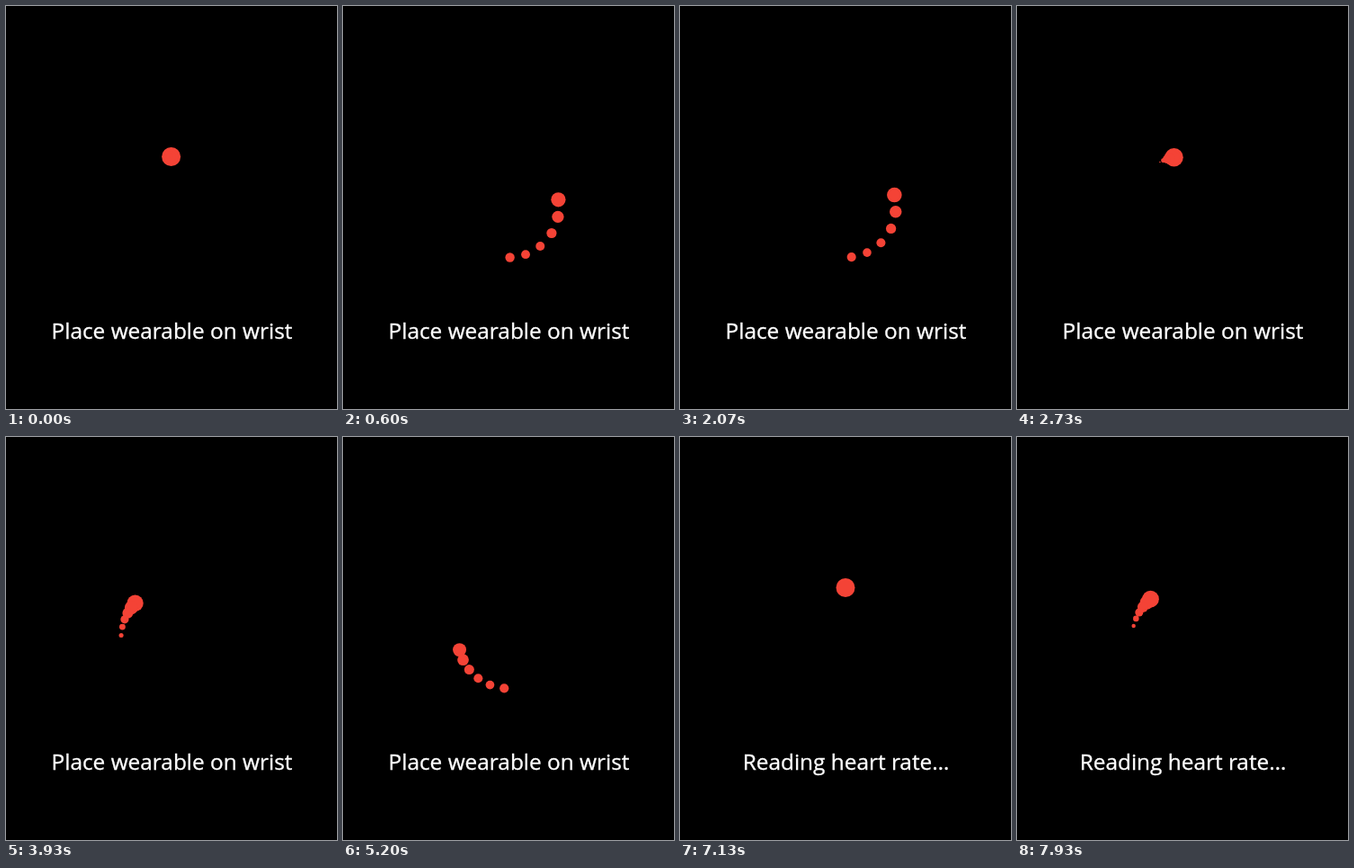
An HTML page that plays this animation: 368 by 448 pixels, repeating every 8 s.

```html
<!DOCTYPE html>
<html lang="en">
<head>
<meta charset="utf-8">
<style>
  html, body { margin: 0; width: 100%; height: 100%; overflow: hidden; background: #000; }
  svg { display: block; width: 368px; height: 448px; }
  circle { fill: #f44336; }
  text {
    font: 24.4px "Open Sans", "Noto Sans", sans-serif;
    fill: #fff; stroke: #fff; stroke-width: .35px; text-anchor: middle;
  }
</style>
</head>
<body>
<svg viewBox="0 0 368 448">
  <g id="spinner"></g>
  <text id="label" x="184.5" y="370"></text>
</svg>
<script>
const LOOP = 8000, FPS = 15;
const SWITCH = 5530;                 // the message changes and the spinner restarts
const FIRST_TURN = 217, RESTART = 5657;
const TURN = 1316, STAGGER = 32, DOTS = 6;
const PERIOD = TURN + STAGGER * (DOTS - 1);
const CENTER = { x: 184, y: 223.5 }, ORBIT = 56, MAX_RADIUS = 10.5;

const spinner = document.getElementById('spinner');
const label = document.getElementById('label');
const dots = Array.from({ length: DOTS }, () =>
  spinner.appendChild(document.createElementNS('http://www.w3.org/2000/svg', 'circle')));

const bezier = (a, b, s) => 3 * a * s * (1 - s) ** 2 + 3 * b * s * s * (1 - s) + s ** 3;

// cubic-bezier(.25, .1, .25, 1), solved by bisection
function ease(x) {
  if (x <= 0) return 0;
  if (x >= 1) return 1;
  let low = 0, high = 1;
  for (let i = 0; i < 24; i++) {
    const mid = (low + high) / 2;
    if (bezier(.25, .25, mid) < x) low = mid; else high = mid;
  }
  return bezier(.1, 1, low);
}

function draw(time) {
  const reading = time >= SWITCH;
  const message = reading ? 'Reading heart rate…' : 'Place wearable on wrist';
  if (label.textContent !== message) label.textContent = message;

  const elapsed = reading
    ? Math.max(0, time - RESTART) % PERIOD
    : (time - FIRST_TURN + PERIOD) % PERIOD;

  dots.forEach((dot, i) => {
    const progress = ease((elapsed - i * STAGGER) / TURN);
    const angle = progress * 2 * Math.PI;
    const rank = i / (DOTS - 1);
    // the leading dot grows during the turn while the last one shrinks
    const size = rank + (1 - 2 * rank) * progress;
    dot.setAttribute('cx', CENTER.x + ORBIT * Math.sin(angle));
    dot.setAttribute('cy', CENTER.y - ORBIT * Math.cos(angle));
    dot.setAttribute('r', MAX_RADIUS * size);
  });
}

function tick() {
  const time = performance.now() % LOOP;
  draw(Math.floor((time + 4) * FPS / 1000) * 1000 / FPS % LOOP);
  requestAnimationFrame(tick);
}
tick();
</script>
</body>
</html>
```
